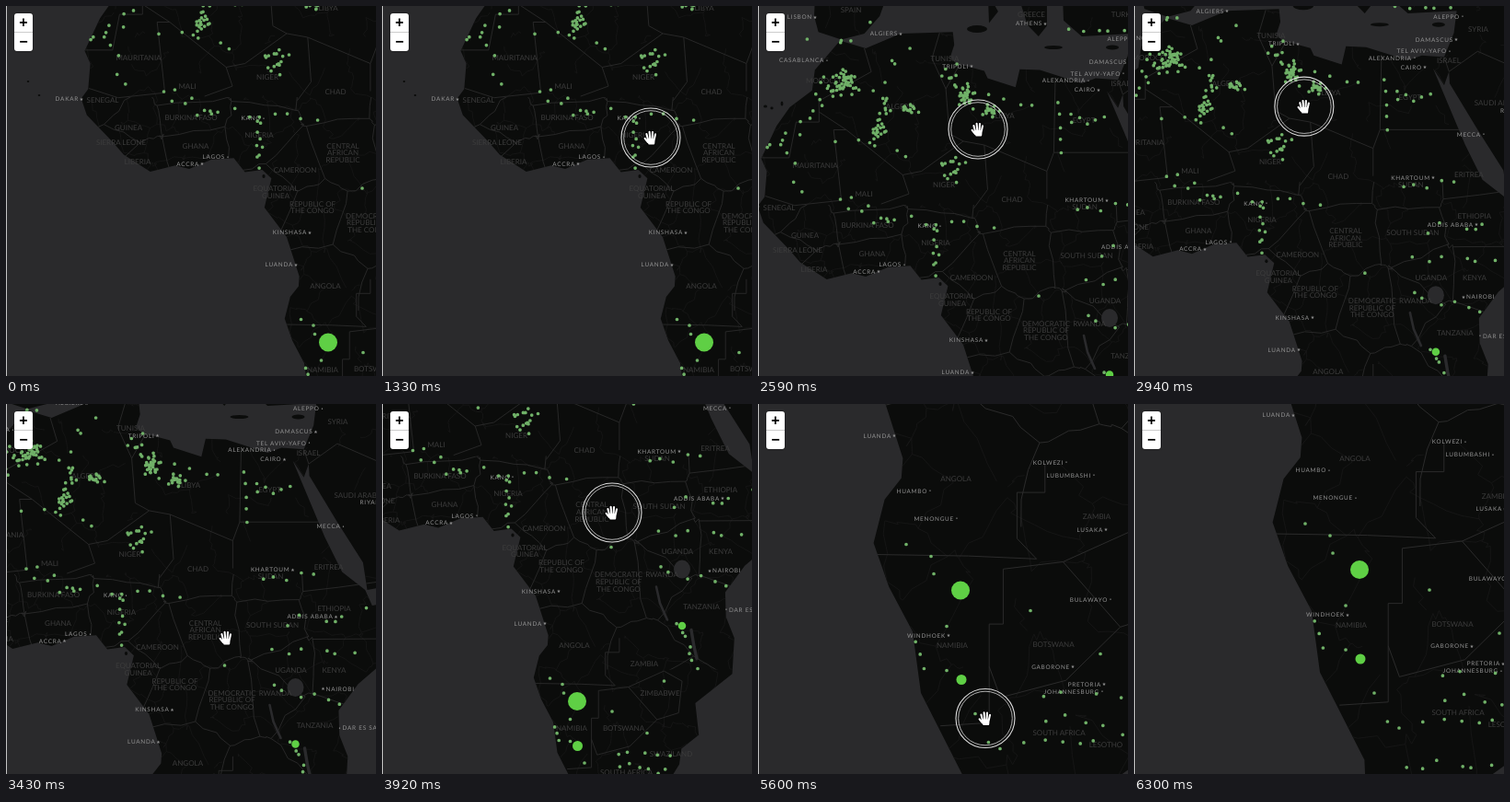
Write an HTML page that moves like this. It is 402 px wide and 402 px high and loops after 6510 ms.

```html
<!DOCTYPE html>
<html lang="en">
<head>
<meta charset="utf-8">
<title>Dark map tour</title>
<style>
  html, body { margin: 0; width: 100%; height: 100%; overflow: hidden; background: #2a2a2c; }
  svg { position: absolute; left: 0; top: 0; width: 402px; height: 402px; display: block; }
  .edge { position: absolute; left: 0; top: 0; width: 1px; height: 100%; background: #c4c4c4; }
  .land { fill: #0b0c0b; }
  .water { fill: #2a2a2c; }
  .lake { stroke: #2a2a2c; stroke-linecap: round; }
  .minor, .border { fill: none; stroke-linejoin: round; }
  .minor { stroke: #191919; stroke-width: .7; }
  .border { stroke: #2b2b2b; stroke-width: .9; }
  .near .minor { stroke-width: .4; }
  .near .border { stroke-width: .5; }
  .dots { fill: none; stroke-linecap: round; vector-effect: non-scaling-stroke; }
  text { font-family: Lato, "Open Sans", sans-serif; text-rendering: geometricPrecision; }
  .country { font-size: 8px; fill: #3c3c3c; text-anchor: middle; }
  .city { font-size: 6.4px; letter-spacing: .75px; fill: #929292; }
  .mark { font: 5px "DejaVu Sans", sans-serif; fill: #929292; text-anchor: middle; }
  .hand { fill: none; stroke-linecap: round; stroke-linejoin: round; }
  .ring { fill: none; stroke: #dcdcdc; }
  .zoom { position: absolute; left: 9px; top: 8px; width: 20px; height: 41px; border-radius: 3px;
    background: #fff; box-shadow: 0 0 2px rgba(0,0,0,.6); overflow: hidden; }
  .zoom span { display: block; height: 20px; font: bold 16px/20px "Liberation Sans", Arial, sans-serif;
    text-align: center; color: #000; }
  .zoom span + span { border-top: 1px solid #ccc; }
</style>
</head>
<body>
<svg viewBox="0 0 402 402">
  <defs>
    <clipPath id="clip"></clipPath>
    <clipPath id="band"><rect x="-60" y="178" width="600" height="232"/></clipPath>
  </defs>
  <g id="map">
    <g id="base"></g>
    <g id="far"></g>
    <g id="close" transform="translate(174.5 354.5) scale(.5)"></g>
    <g id="points"></g>
  </g>
  <g id="cursor">
    <g id="ring">
      <circle class="ring" r="32" stroke-width="1.1"/>
      <circle class="ring" r="29.3" stroke-width=".8"/>
    </g>
    <g id="hand"></g>
  </g>
</svg>
<div class="zoom"><span>+</span><span>−</span></div>
<div class="edge"></div>
<script>
const $ = id => document.getElementById(id);
const add = (parent, tag, attrs, text) => {
  const el = document.createElementNS('http://www.w3.org/2000/svg', tag);
  for (const k in attrs) el.setAttribute(k, attrs[k]);
  if (text) el.textContent = text;
  return parent.appendChild(el);
};
let seed = 11;
const rnd = () => (seed = seed * 16807 % 2147483647) / 2147483647;
const gauss = () => rnd() + rnd() + rnd() + rnd() - 2;

// Mercator: longitude and latitude to map units
const project = (lon, lat) => [
  161.2 + 7.57 * lon,
  292 - 433.7 * Math.asinh(Math.tan(lat * Math.PI / 180))
];
const toPath = pts => 'M' + pts.map(p => p[0].toFixed(1) + ' ' + p[1].toFixed(1)).join('L');
const trace = list => {
  const pts = [];
  for (let i = 0; i < list.length; i += 2) pts.push(project(list[i], list[i + 1]));
  return toPath(pts);
};

// Key points of the coasts
const west = [-5.9,35.8, -9.3,32.5, -9.7,30, -12.9,27.9, -14.8,25.5, -17,21.2, -16.2,19.5, -16.5,16,
  -17.5,14.7, -16.7,12.4, -13.2,8.8, -11.4,6.8, -7.6,4.35, -4,5.25, -2,4.75, 1.2,6.1, 4.4,6.3, 6,4.3,
  8.5,4.6, 9.8,3.4, 8.8,-.8, 12,-5, 13.8,-10.6, 13.7,-12, 12.5,-13.5, 11.7,-16.5, 12.8,-19.5,
  14.5,-22.5, 15.1,-26.5, 18.3,-32, 18.4,-34.1, 20,-34.8];
const east = [25.6,-34, 30.5,-31, 32.6,-28, 32.9,-26, 35.4,-24.2, 34.9,-20, 40.2,-16, 40.5,-11, 39.3,-8,
  39.2,-4.5, 42,-.7, 48,4.5, 51.2,11.8, 44,10.5, 43,12.7, 39.7,15.2, 37.2,20, 32.6,29.9, 34.2,27.8,
  34.9,29.5, 35,28, 39,22, 42.7,16.5, 43.3,12.7, 60,16, 60,46, 26,46, 26.4,38.3, 29,36.5, 36,36.8,
  35.6,34.2, 34.2,31.3];
const north = [31,31.5, 29,30.9, 23,32.5, 20.1,32.6, 19.5,30.4, 15.5,31.5, 15,32.4, 11,33.3, 10.1,34,
  10.7,35.5, 10.5,37, 3,36.8, -2,35.1, -5.3,35.9];
const iberia = [-9,45, -9.4,38.8, -8.8,37, -5.5,36.1, -2.2,36.8, 0,38.8, 3,45];
const italy = [15.7,38, 17,39.3, 16.5,40, 18.5,40, 13,43, 15.6,40];
const greece = [19.5,42, 21.2,37.8, 22.8,36.5, 24,37.7, 24,42];
const landPath = [[...west, ...east, ...north], iberia, italy, greece].map(s => trace(s) + 'Z').join('');
const base = $('base');
add(base, 'path', { class: 'land', d: landPath });
add($('clip'), 'path', { d: landPath });
const blob = (cls, cx, cy, rx, ry) => add(base, 'ellipse', { class: cls, cx, cy, rx, ry });
for (const isle of [[267,-13,11,4], [350,7,10,2], [414,7,7,2.5], [37,71,2,1.5], [44,73,1.6,1.4], [55,68,1.4,2.5],
  [-29,161,1.3,1], [-17,176,1.3,1], [227,264,1.6,2]]) blob('land', ...isle);

// Edges between the areas nearest to each site
const edges = (sites, reach, keep) => {
  let d = '';
  sites.forEach((a, i) => sites.slice(i + 1).forEach(b => {
    const dx = b[0] - a[0], dy = b[1] - a[1];
    if (Math.hypot(dx, dy) > reach || rnd() > keep(a)) return;
    const mx = (a[0] + b[0]) / 2, my = (a[1] + b[1]) / 2;
    let lo = -4, hi = 4;
    for (const c of sites) {
      if (c === a || c === b) continue;
      const ex = c[0] - a[0], ey = c[1] - a[1];
      const slope = ex * -dy + ey * dx;
      const room = (ex * (c[0] + a[0]) + ey * (c[1] + a[1])) / 2 - mx * ex - my * ey;
      if (slope > 0) hi = Math.min(hi, room / slope);
      else lo = Math.max(lo, room / slope);
    }
    if (lo >= hi) return;
    const pts = [];
    for (let k = 0; k <= 4; k++) {
      const u = lo + (hi - lo) * k / 4, rough = k % 4 ? 3 : 0;
      pts.push([mx - dy * u + gauss() * rough, my + dx * u + gauss() * rough]);
    }
    d += toPath(pts);
  }));
  return d;
};
const inner = add(base, 'g', { 'clip-path': 'url(#clip)' });
const provinces = [];
for (let x = -40; x < 520; x += 32) for (let y = -60; y < 580; y += 32)
  provinces.push([x + gauss() * 14, y + gauss() * 14]);
add(inner, 'path', { class: 'minor', d: edges(provinces, 70, p => p[1] < 170 ? .3 : .75) });

// Long borders of the desert and the south
const borders = [
  [-2.2,35.1, -1.2,32.3, -8.7,28.7, -8.7,26, -12,26, -13,21.3, -17,21.3],
  [-8.7,27.3, -4.8,25, 3.3,19, 6,19.5, 12,23.5, 10,24.5, 9.5,30.2, 7.5,33.9, 8.6,36.9],
  [9.5,30.2, 11.5,33.2], [-4.8,25, -6.6,25, -5.5,15.5, -12.2,14.8, -16.4,16.1],
  [12,23.5, 15,23, 24,19.5, 24,15.7], [15,23, 15.5,17, 13.5,14.4], [3.3,19, 4.2,16.4, .2,15],
  [36.9,22, 25,22, 25.2,31.6], [25,22, 24,19.5], [34.2,31.3, 34.9,29.5, 39,32, 47,29],
  [11.8,-17.3, 18.5,-17.4, 23.4,-17.6, 22,-16.2, 22,-13, 24,-13, 24,-11],
  [25.3,-17.8, 21,-18.3, 21,-22, 20,-22, 20,-28.4, 16.5,-28.6],
  [20,-24.8, 20.8,-26.8, 25.5,-25.7, 29.4,-22.2, 25.3,-17.8, 30.4,-15.6, 33,-17, 32.5,-21.3, 29.4,-22.2]
];
add(inner, 'path', { class: 'border', d: borders.map(trace).join('') });

// Lakes
blob('water', 411, 301, 9, 10);
add(base, 'path', { class: 'lake', d: 'M383 320L387 338L395 356', fill: 'none', 'stroke-width': 2.6 });
add(base, 'path', { class: 'lake', d: 'M421 367L424 385L427 398', fill: 'none', 'stroke-width': 3.4 });

// Labels: "|" breaks lines
const country = (layer, x, y, name) => {
  const rows = name.split('|');
  rows.forEach((row, i) => add(layer, 'text',
    { class: 'country', x, y: y + 2.9 + (i - (rows.length - 1) / 2) * 7.6 }, row));
};
const city = (layer, x, y, name, mark = '★', side = -1) => {
  add(layer, 'text', { class: 'city', x: x + side * 3, y: y + 2.4, 'text-anchor': side < 0 ? 'end' : 'start' }, name);
  add(layer, 'text', { class: 'mark', x, y: y + 1.9 }, mark);
};
const far = $('far'), close = $('close');
const countries = [
  [102,43,'MOROCCO'], [184,71,'ALGERIA'], [232,19,'TUNISIA'], [297,81,'LIBYA'], [383,86,'EGYPT'],
  [91,135,'MAURITANIA'], [144,166,'MALI'], [231,156,'NIGER'], [305,172,'CHAD'], [52,181,'SENEGAL'],
  [80,211,'GUINEA'], [72,227,'SIERRA LEONE'], [90,248,'LIBERIA'], [148,200,'BURKINA FASO'], [153,231,'GHANA'],
  [222,219,'NIGERIA'], [261,257,'CAMEROON'], [313,238.5,'CENTRAL|AFRICAN|REPUBLIC'], [240,281,'EQUATORIAL|GUINEA'],
  [280,297.5,'REPUBLIC OF|THE CONGO'], [342,314.5,'DEMOCRATIC|REPUBLIC OF|THE CONGO'], [386,233,'SOUTH SUDAN'],
  [384,180.5,'SUDAN'], [447,170,'ERITREA'], [453,215,'ETHIOPIA'], [406,282,'UGANDA'], [389,307,'RWANDA'],
  [453,282,'KENYA'], [432,342,'TANZANIA'], [294,383.5,'ANGOLA'], [370,404,'ZAMBIA'], [387,435.5,'ZIMBABWE'],
  [291,474,'NAMIBIA'], [347.5,473.5,'BOTSWANA'], [350.5,521.5,'SOUTH AFRICA'], [399,502,'SWAZILAND'],
  [457,12,'SYRIA'], [425,46,'ISRAEL'], [480,92,'SAUDI ARABIA'], [326,-29,'GREECE'], [130,-34,'SPAIN'], [428,-29,'TURKEY']
];
countries.forEach(c => country(far, ...c));
// Crowded middle: borders run halfway between the country names
const middle = add(inner, 'g', { 'clip-path': 'url(#band)' });
add(middle, 'path', { class: 'border', d: edges(countries, 150, () => 1) });

[[104,21,'CASABLANCA','•'], [399,53,'CAIRO'], [388,43,'ALEXANDRIA','•'], [426,35.5,'TEL AVIV-YAFO','•'],
 [261,27.5,'TRIPOLI'], [184,-8,'ALGIERS'], [341,-19,'ATHENS'], [91,-26,'LISBON'], [433,23,'DAMASCUS'],
 [440,-2,'ALEPPO','•'], [463,126,'MECCA','•'], [512,100,'RIYADH'], [408,173,'KHARTOUM'], [455,224,'ADDIS ABABA'],
 [441,302.5,'NAIROBI','★',1], [459,345,'DAR ES SALAAM','•',1], [188,243,'LAGOS','•'], [160,250.5,'ACCRA'],
 [227,201,'KANO','•'], [277,325,'KINSHASA'], [262,360,'LUANDA'], [29,180,'DAKAR'], [397,530.5,'DURBAN','•']
].forEach(c => city(far, ...c));
[[240,59,'ANGOLA'], [393,100,'ZAMBIA'], [236,240,'NAMIBIA'], [346,239,'BOTSWANA'], [352,335,'SOUTH AFRICA'], [403,348,'LESOTHO']
].forEach(c => country(close, ...c));
[[173,12,'LUANDA'], [212,72,'HUAMBO','•'], [241,102,'MENONGUE','•'], [360,41,'KOLWEZI','•'], [390,55,'LUBUMBASHI','•'],
 [403,114,'LUSAKA'], [408,190,'BULAWAYO','•'], [232,229,'WINDHOEK'], [367,263,'GABORONE'], [401,282,'PRETORIA'],
 [399,290,'JOHANNESBURG','•']
].forEach(c => city(close, ...c));

// Data points keep their size while the map scales
const dots = (pts, size = 3.7, stroke = '#70b168') => add($('points'), 'path', {
  class: 'dots', stroke, 'stroke-width': size, d: pts.map(p => `M${p[0].toFixed(1)} ${p[1].toFixed(1)}h.01`).join('')
});
const scatter = (n, x, y, sx, sy = sx) =>
  dots(Array.from({ length: n }, () => [x + gauss() * sx * 1.7, y + gauss() * sy * 1.7]));
const trail = (n, x1, y1, x2, y2, loose) => dots(Array.from({ length: n }, (_, i) => {
  const u = i / (n - 1);
  return [x1 + (x2 - x1) * u + gauss() * loose, y1 + (y2 - y1) * u + gauss() * loose];
}));
// Dense desert groups
scatter(42, 124, 45, 7, 6);
scatter(10, 106, 54, 9, 5);
scatter(9, 166, 70, 5);
scatter(14, 192, 74, 4, 3);
scatter(18, 162, 96, 5);
scatter(32, 256, 60, 6);
scatter(18, 284, 76, 4, 5);
scatter(7, 237, 35, 5);
scatter(16, 240, 138, 8, 6);
// Loose rows and coasts
trail(9, 97, 73, 40, 120, 6);
trail(5, 60, 110, 75, 165, 5);
trail(6, 114, 110, 195, 120, 8);
trail(5, 186, 13, 157, 55, 7);
trail(8, 116, 175, 170, 200, 8);
trail(9, 165, 195, 284, 200, 5);
trail(9, 222, 203, 224, 252, 5);
trail(4, 283, 59, 326, 71, 6);
trail(5, 355, 66, 359, 121, 1);
trail(6, 362, 82, 402, 92, 8);
trail(5, 374, 185, 432, 178, 3);
trail(6, 401, 233, 483, 220, 7);
trail(6, 383, 258, 477, 262, 5);
trail(6, 388, 302, 460, 320, 9);
trail(7, 407, 357, 428, 410, 3);
trail(5, 369, -16, 426, -14, 6);
trail(5, 84, -2, 147, 0, 14);
// Far south
dots([[334, 277], [267.5, 419.5], [281, 426], [282.5, 435.5], [289.5, 464], [335, 455.5], [373, 479], [391.5, 422.5]]);
trail(3, 272.5, 473, 277.5, 487, 1);
trail(2, 289.5, 488, 305, 511.5, 0);
trail(5, 339.5, 500.5, 398.5, 504, 3);
trail(7, 313, 531.5, 370, 526, 5);
trail(6, 344, 515, 394, 519, 4);
trail(6, 323, 550, 369, 549.5, 3);
const bright = '#5fcf45';
dots([[411, 362.5]], 8.5, bright);
dots([[297.5, 493]], 11, bright);
dots([[297, 444.5]], 20, bright);

// Grabbing hand
const fingers = 'M-3 2L-4.6 -4M-.8 1L-1.4 -6.2M1.6 1L2 -6M3.8 2L5 -3.6M-3 5L-6.4 .8M-2.6 2H3.6L3.2 6.4H-1.8Z';
for (const [stroke, width] of [['#000', 4], ['#fff', 2.1]])
  add($('hand'), 'path', { class: 'hand', d: fingers, stroke, 'stroke-width': width });
add($('hand'), 'path', { d: 'M-3 2H4L3.4 6.6H-2Z', fill: '#fff' });

// Timelines: [ms, values...]
const view = [[1400, 53, -79, 1], [1960, 0, 0, 1], [2380, -29, 38, 1], [2590, -29, 38, 1],
  [3080, -96.5, 7, 1], [3430, -96.5, 7, 1], [3920, -85, -121.5, 1], [4130, -88.5, -150, 1], [4480, -88.5, -150, 1],
  [4760, -399, -664, 2], [5320, -399, -664, 2], [5880, -349, -709, 2]];
const hand = [[700, 352, 350], [1190, 292, 143], [1400, 292, 143], [1960, 239, 222], [2100, 230, 234],
  [2450, 239, 134], [2590, 239, 134], [3080, 171.5, 103], [3360, 239, 254], [3430, 239, 254], [3920, 250, 118],
  [4130, 247, 90], [4480, 222, 364], [5320, 222, 364], [5880, 272, 319], [6230, 290, 300]];
const presses = [[1190, 2100], [2450, 3080], [3480, 4060], [5180, 5880]];

const clamp = v => Math.max(0, Math.min(1, v));
const at = (track, t) => {
  const i = track.findIndex(k => k[0] > t);
  if (i < 0) return track[track.length - 1].slice(1);
  if (i === 0) return track[0].slice(1);
  const a = track[i - 1], b = track[i];
  const p = (t - a[0]) / (b[0] - a[0]), e = p * p * (3 - 2 * p);
  return a.slice(1).map((v, n) => v + (b[n + 1] - v) * e);
};

const LOOP = 6510, STEP = 70;
const draw = time => {
  const t = Math.floor(time % LOOP / STEP) * STEP;
  const [x, y, s] = at(view, t);
  $('map').setAttribute('transform', `translate(${x} ${y}) scale(${s})`);
  const detail = clamp((t - 4830) / 210);
  $('map').classList.toggle('near', detail > .5);
  far.setAttribute('opacity', 1 - detail);
  close.setAttribute('opacity', detail);

  const [cx, cy] = at(hand, t);
  $('cursor').setAttribute('transform', `translate(${cx} ${cy})`);
  $('cursor').style.display = t >= 700 && t < 6300 ? '' : 'none';
  const press = presses.find(p => t >= p[0] && t <= p[1]);
  $('ring').style.display = press ? '' : 'none';
  if (press) {
    const p = clamp((t - press[0]) / 140);
    $('ring').setAttribute('transform', `scale(${1.4 - .4 * p})`);
    $('ring').setAttribute('opacity', .4 + .6 * p);
  }
};
const start = performance.now();
const tick = () => {
  draw(performance.now() - start);
  requestAnimationFrame(tick);
};
tick();
</script>
</body>
</html>
```
